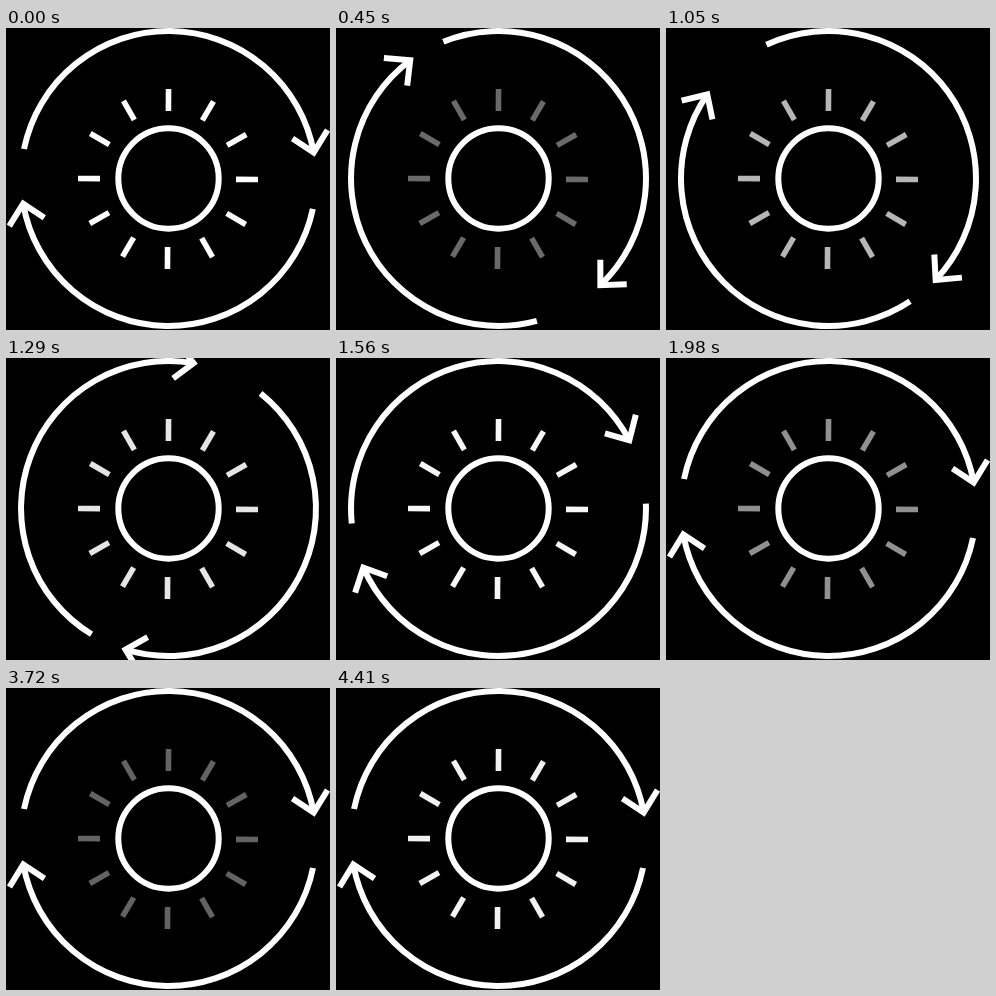
Write an HTML page that moves like this. It is 324x302 px and loops after 4500 ms.

```html
<!DOCTYPE html>
<html lang="en">
<head>
<meta charset="utf-8">
<title>Day cycle</title>
<style>
  html, body { margin: 0; width: 100%; height: 100%; overflow: hidden; background: #000; }
  svg { display: block; width: 100%; height: 100%; }
</style>
</head>
<body>
<svg viewBox="0 0 324 302" fill="none" stroke="#fff" stroke-width="6">
  <defs>
    <g id="arrow">
      <path d="M18 121A147.5 147.5 0 0 1 307.7 124.5"/>
      <path d="M286.5 110.5L307.7 124.5L321.5 102"/>
    </g>
  </defs>
  <rect width="324" height="302" fill="#000" stroke="none"/>
  <circle cx="162.5" cy="150.5" r="50.2"/>
  <g id="rays" stroke-width="5.6"></g>
  <use id="first" href="#arrow"/>
  <use id="second" href="#arrow"/>
</svg>
<script>
const LOOP = 4500, SPIN = 1800, LEAD = 30, DIM = 0.36;
// Times at which the rays are brightest and dimmest, alternating
const TURNS = [0, 520, 1500, 2250, 3000, 3780, 4500];

const el = id => document.getElementById(id);
const rays = el('rays'), first = el('first'), second = el('second');

for (let i = 0; i < 12; i++) {
  const ray = document.createElementNS('http://www.w3.org/2000/svg', 'path');
  ray.setAttribute('d', 'M162 61V83');
  ray.setAttribute('transform', `rotate(${i * 30 + 0.35} 162 151)`);
  rays.append(ray);
}

const clamp = x => Math.min(1, Math.max(0, x));
const smooth = x => x * x * (3 - 2 * x);
const spin = t => 360 * smooth(clamp(t / SPIN));
const turn = (node, deg) => node.setAttribute('transform', `rotate(${deg} 162.5 150.5)`);

function glow(t) {
  let i = 0;
  while (t >= TURNS[i + 1]) i++;
  const x = (t - TURNS[i]) / (TURNS[i + 1] - TURNS[i]);
  const k = (x + (1 - Math.cos(Math.PI * x)) / 2) / 2;
  return 1 - (1 - DIM) * (i % 2 ? 1 - k : k);
}

function draw(t) {
  turn(first, spin(t));
  turn(second, 180 + spin(t + LEAD));
  const v = Math.round(255 * glow(t));
  rays.setAttribute('stroke', `rgb(${v},${v},${v})`);
}

const start = performance.now();
function tick() {
  draw((performance.now() - start) % LOOP);
  requestAnimationFrame(tick);
}
tick();
</script>
</body>
</html>
```
